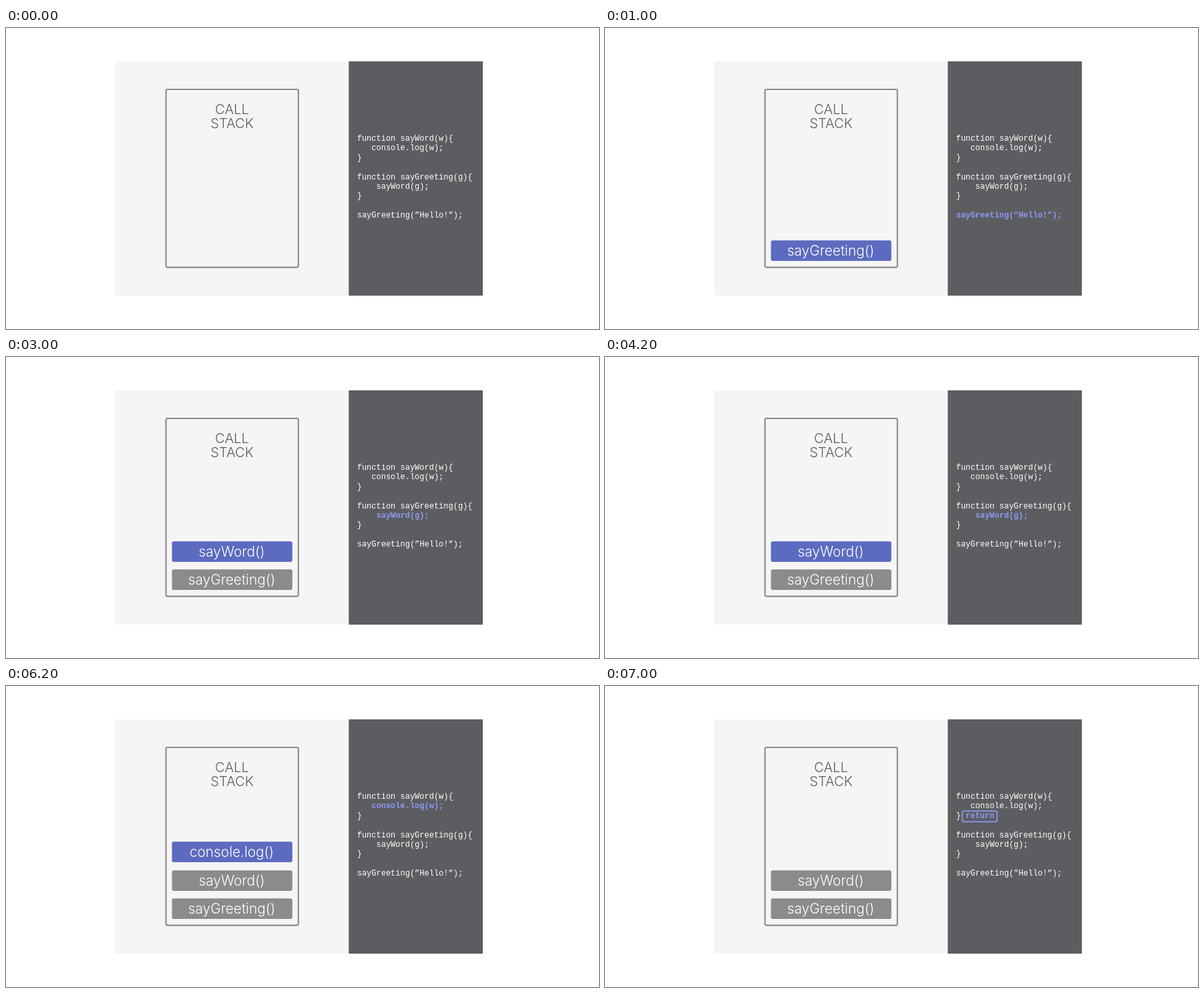
An HTML page that plays this animation: 888 px wide and 451 px high, repeating every 8 s.

```html
<!DOCTYPE html>
<html lang="en">
<head>
<meta charset="utf-8">
<title>Call stack</title>
<style>
  html, body { margin: 0; width: 100%; height: 100%; overflow: hidden; background: #fff; }
  svg { display: block; width: 100%; height: 100%; }
  .title, .call text { font: 300 20.2px Inter, "Open Sans", sans-serif; text-anchor: middle; }
  .title { fill: #5c5d60; }
  .call rect { fill: #8a8b8d; }
  .call text { font-size: 20.8px; fill: #fff; }
  .call.active rect { fill: #5c6bc0; }
  .code { font: 12px "Liberation Mono", "Courier New", monospace; fill: #fff; }
  .code .active { font-weight: bold; fill: #8f98f5; }
  .hidden { visibility: hidden; }
</style>
</head>
<body>
<svg viewBox="0 0 888 451">
  <rect x="163" y="50" width="551" height="351" fill="#f5f5f5"/>
  <rect x="513.3" y="50" width="200.7" height="351" fill="#5c5d60"/>
  <rect x="239.6" y="92" width="198.2" height="266.6" rx="2" fill="none" stroke="#8a8b8d" stroke-width="2.1"/>
  <text class="title" x="338.5" y="129">CALL</text>
  <text class="title" x="338.5" y="150">STACK</text>
  <g id="stack"></g>
  <g id="code" class="code"></g>
  <g id="return" class="code">
    <rect x="535.2" y="187.4" width="52" height="16" rx="2.5" fill="none" stroke="#8f98f5" stroke-width="1.6"/>
    <text class="active" x="540" y="198">return</text>
  </g>
</svg>
<script>
const LOOP = 8000, CHAR = 7.2, LINE = 14.4;
const calls = [["sayGreeting()", 318.3], ["sayWord()", 276.2], ["console.log()", 233.3]];
const source = [
  "function sayWord(w){",
  "   console.log(w);",
  "}",
  "",
  "function sayGreeting(g){",
  "    sayWord(g);",
  "}",
  "",
  "sayGreeting(”Hello!”);"
];
// depth: calls on the stack, active: highlighted call, line: highlighted code line
const steps = [
  { start: 0, depth: 0, active: -1, line: -1 },
  { start: 1000, depth: 1, active: 0, line: 8 },
  { start: 3000, depth: 2, active: 1, line: 5 },
  { start: 5000, depth: 3, active: 2, line: 1 },
  { start: 7000, depth: 2, active: -1, line: -1, returning: true }
];

function add(parent, tag, attributes, text = "") {
  const node = document.createElementNS("http://www.w3.org/2000/svg", tag);
  for (const [name, value] of Object.entries(attributes)) node.setAttribute(name, value);
  node.textContent = text;
  return parent.appendChild(node);
}

const stack = document.getElementById("stack");
const code = document.getElementById("code");
const returnMark = document.getElementById("return");

const blocks = calls.map(([label, y]) => {
  const block = add(stack, "g", { class: "call" });
  add(block, "rect", { x: 248.5, y, width: 180.3, height: 30.7, rx: 2.8 });
  add(block, "text", { x: 338, y: y + 22.7 }, label);
  return block;
});

const lines = source.map((line, i) => {
  const text = line.trimStart();
  const x = 525.7 + (line.length - text.length) * CHAR;
  return add(code, "text", { x, y: 169 + i * LINE }, text);
});

function draw(now) {
  const time = now % LOOP;
  const step = steps.findLast(s => s.start <= time);
  blocks.forEach((block, i) => {
    block.classList.toggle("hidden", i >= step.depth);
    block.classList.toggle("active", i === step.active);
  });
  lines.forEach((line, i) => line.classList.toggle("active", i === step.line));
  returnMark.classList.toggle("hidden", !step.returning);
}

function tick() {
  draw(performance.now());
  requestAnimationFrame(tick);
}
tick();
</script>
</body>
</html>
```
